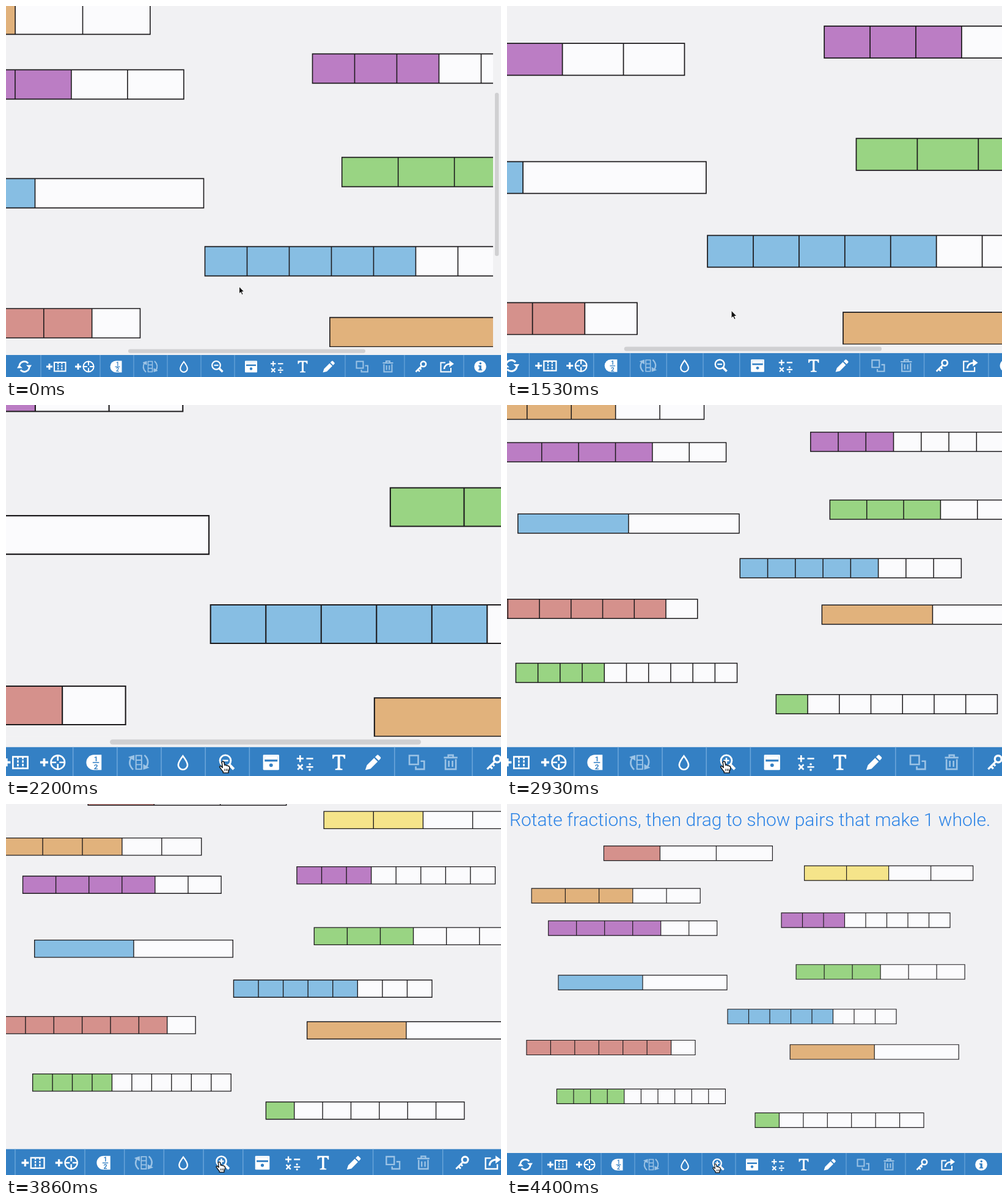
An HTML page for the animation above (6130 ms loop, 810x607 px).

```html
<!DOCTYPE html>
<html lang="en">
<head>
<meta charset="utf-8">
<title>Fraction bars</title>
<style>
html, body { margin: 0; width: 100%; height: 100%; overflow: hidden; background: #f1f1f3; }
svg { display: block; width: 100vw; height: 100vh; }
.title { font: 300 30px Roboto, sans-serif; fill: #2b83e6; }
.half { font: 700 9px Roboto, sans-serif; fill: #3480c4; text-anchor: middle; }
.line { fill: none; stroke: #fff; stroke-width: 2; }
.bold { stroke-width: 2.8; }
.dim { stroke: #9cc3e5; }
.solid { fill: #fff; }
.blue { fill: #3480c4; }
</style>
</head>
<body>
<svg viewBox="0 0 810 607" preserveAspectRatio="none">
  <rect width="810" height="607" fill="#f1f1f3"/>
  <g id="camera">
    <g id="board" stroke="#1c1a1c">
      <text class="title" x="4" y="36" stroke="none">Rotate fractions, then drag to show pairs that make 1 whole.</text>
    </g>
    <g id="scroll">
      <path d="M797 0H810V571H0V558H797Z" fill="#f1f1f3"/>
      <rect x="800" y="142" width="6.4" height="267" rx="3.2" fill="#d0d0d2"/>
      <rect x="200" y="561.4" width="388" height="6.4" rx="3.2" fill="#d0d0d2"/>
    </g>
    <rect y="571" width="810" height="36" fill="#3480c4"/>
    <path id="seps" stroke="#6ba5da" stroke-width="1.2"/>

    <g id="refresh">
      <path class="line bold" d="M22 588A8.2 8.2 0 0 1 36.2 584.6M38 592A8.2 8.2 0 0 1 23.8 595.4"/>
      <path class="solid" d="M33 587.6H42L38.5 593ZM27 592.4H18L21.500 587Z"/>
    </g>

    <g id="addBar">
      <path class="line bold" d="M66 590H76M71 585V595"/>
      <rect class="line" x="79" y="583" width="18.500" height="14.500"/>
      <path class="line" stroke-dasharray="3 1.400" d="M85.200 583V598M91.400 583V598"/>
    </g>

    <g id="addCircle">
      <path class="line bold" d="M113 590H123M118 585V595"/>
      <circle class="line" cx="135" cy="590" r="8.600"/>
      <path class="line" stroke-width="1.600" d="M135 582V588M135 592V598M127 590H133M137 590H143"/>
    </g>

    <g id="fraction">
      <path class="solid" d="M189.500 580.500V599.500H180A9.500 9.500 0 0 1 180 580.500Z"/>
      <path d="M178.500 590.200H186.500" stroke="#3480c4" stroke-width="1.200"/>
      <text class="half" x="182.500" y="588.600">1</text>
      <text class="half" x="182.500" y="598.300">2</text>
    </g>

    <g id="rotate">
      <path class="line dim" d="M229 599Q221.500 592 227 583.500M243 581Q250.500 588 245 596.500"/>
      <path class="dim" fill="#9cc3e5" d="M224 583.500L230 581.500V587ZM248 596.500L242 598.500V593Z"/>
      <path class="line dim" style="stroke-width:1.500" d="M232.500 581.500H239.500V598.500H232.500ZM232.500 587.200H239.500M232.500 592.800H239.500"/>
    </g>

    <path class="line" d="M291 582Q285.200 589.500 285.200 593.200A5.800 5.800 0 0 0 296.800 593.200Q296.800 589.500 291 582Z"/>

    <g id="lens">
      <circle class="line" cx="344" cy="587.800" r="6.800" style="stroke-width:2.200"/>
      <path class="line" style="stroke-width:3.400" d="M349 593L354.500 598.500"/>
      <path id="sign" class="line"/>
    </g>

    <g id="cover">
      <rect class="solid" x="391" y="580.500" width="20" height="19" rx="1"/>
      <path class="blue" d="M393 582.500H409V589H393Z"/>
      <circle class="blue" cx="401" cy="593.500" r="2.200"/>
      <path class="solid" d="M393 582.500H409V586.500H393Z"/>
    </g>

    <g id="math">
      <path class="line" d="M433 585.300H441.500M437.200 581V589.600M445 585.300H453.500M434.200 592.700L440.400 599M440.400 592.700L434.200 599M445 595.800H453.500"/>
      <circle class="solid" cx="449.200" cy="592.300" r="1.400"/>
      <circle class="solid" cx="449.200" cy="599.300" r="1.400"/>
    </g>

    <path class="solid" d="M477.500 580.500H493.500V585.500H492Q491.500 582.500 489 582.500H487V596.500Q487 598 490 598V599.500H481V598Q484 598 484 596.500V582.500H482Q479.500 582.500 479 585.500H477.500Z"/>
    <path class="solid" d="M518.500 599.500L520.500 593.500L529.500 584.500L534 589L525 598ZM530.700 583.300L533 581Q534 580 535 581L537.400 583.400Q538.400 584.400 537.400 585.400L535.200 587.700Z"/>

    <path class="line dim" d="M573.500 581.500H584.500V592.500H573.500ZM587.500 588.500H592V598.500H581.500V595"/>
    <path class="line dim" d="M616.500 584H633.500M622 583V581H628V583M618.500 586V598.500H631.500V586M622.700 588V595.500M627.300 588V595.500"/>

    <g id="key">
      <circle class="line" cx="683" cy="585.800" r="4.200" style="stroke-width:2.600"/>
      <path class="line" style="stroke-width:2.500" d="M680 589L670.500 598.500M674 595L677 598M677 592L679.500 594.500"/>
    </g>

    <g id="share">
      <path class="line" d="M719 583.500H711.500V598.500H728V592"/>
      <path class="line" style="stroke-width:2.600" d="M717 594Q717.500 586 727 585.500"/>
      <path class="solid" d="M725.500 580L733 585.500L725.500 591Z"/>
    </g>

    <g id="info">
      <circle class="solid" cx="776" cy="590" r="9.800"/>
      <circle class="blue" cx="776.300" cy="584.800" r="1.800"/>
      <path class="blue" d="M773 588H777.800V594.500H779.200V596.300H773V594.500H774.500V589.800H773Z"/>
    </g>

    <g id="cursor">
      <path id="arrow" d="M0 0V11.800L2.700 9.300L4.500 13.500L6.500 12.600L4.700 8.600H8.300Z" fill="#111" stroke="#fff" stroke-width=".9"/>
      <path id="hand" d="M-1.400 1.200Q-.2 -.6 1.200 1L2.200 5.200Q3.500 4 4.400 5.600Q5.700 4.700 6.400 6.200Q8 5.700 8.100 7.600V10.200L6.800 12.400V14.600H.2V13Q-1.500 11.600-3.200 8.600Q-5 6.800-3.600 6.200Q-2.400 6-.6 8Z" fill="#fff" stroke="#111" stroke-width="1.100" stroke-linejoin="round"/>
      <path id="fingers" d="M2.200 9.500V12.300M4.200 9.500V12.300M6 9.500V12.300" stroke="#111" stroke-width=".8"/>
    </g>
  </g>
</svg>
<script>
const LOOP = 6130, CLICK = 2795;
const $ = id => document.getElementById(id);
const color = {
  red: '#d5918c', yellow: '#f5e48a', orange: '#e1b27c',
  purple: '#bb7dc4', green: '#99d483', blue: '#87bee3'
};
// x, y, parts, shaded parts, colour
const bars = [
  [158.4, 68.6, 3, 1, 'red'], [486.6, 101.2, 4, 2, 'yellow'],
  [40.2, 138.2, 5, 3, 'orange'], [67.7, 191.2, 6, 4, 'purple'],
  [449, 178.2, 8, 3, 'purple'], [473.1, 262.8, 6, 3, 'green'],
  [84, 280.2, 2, 1, 'blue'], [361, 335.8, 8, 5, 'blue'],
  [32, 386.5, 7, 6, 'red'], [463.2, 393.8, 2, 1, 'orange'],
  [81.4, 466.4, 10, 4, 'green'], [406, 505.4, 7, 1, 'green']
];
const WIDTH = 276, HEIGHT = 24;

function add(name, attrs) {
  const el = document.createElementNS('http://www.w3.org/2000/svg', name);
  for (const key in attrs) el.setAttribute(key, attrs[key]);
  $('board').append(el);
}

for (const [x, y, parts, shaded, hue] of bars) {
  const step = WIDTH / parts;
  const box = { x, y, height: HEIGHT };
  add('rect', { ...box, width: WIDTH, fill: '#fbfbfd', stroke: 'none' });
  add('rect', { ...box, width: step * shaded, fill: color[hue], stroke: 'none' });
  let d = `M${x} ${y}h${WIDTH}v${HEIGHT}h${-WIDTH}z`;
  for (let i = 1; i < parts; i++) d += `M${x + step * i} ${y}v${HEIGHT}`;
  add('path', { d, fill: 'none' });
}
$('seps').setAttribute('d', [57, 154, 209, 264, 319, 374, 555, 652, 749]
  .map(x => `M${x} 571v36`).join(''));

const unit = (t, start, length) => Math.min(1, Math.max(0, (t - start) / length));
const ease = u => u ** 1.78 / (u ** 1.78 + (1 - u) ** 1.78);
const show = (id, on) => $(id).setAttribute('visibility', on ? 'visible' : 'hidden');

function draw(time) {
  const t = Math.floor((time + 6.7) * 0.015) / 0.015;
  const zoom = 1 + 0.312 * (ease(unit(t, 1166, 1000)) - ease(unit(t, 3403, 1000)));
  $('camera').setAttribute('transform', `translate(296 607) scale(${zoom}) translate(-296 -607)`);

  const near = time < CLICK;
  $('board').setAttribute('transform', near ? 'translate(-396.5 -278) scale(2)' : '');
  $('board').setAttribute('stroke-width', near ? 0.8 : 1.15);
  show('scroll', near);
  $('sign').setAttribute('d', near ? 'M340.5 587.8H347.5' : 'M340.5 587.8H347.5M344 584.3V591.3');

  const move = ease(unit(t, 1200, 670));
  const x = 381.5 - 40.5 * move, y = 459 + 129.5 * move ** 1.42;
  $('cursor').setAttribute('transform', `translate(${x} ${y})`);
  const over = y > 571;
  show('arrow', !over);
  show('hand', over);
  show('fingers', over);
}

const begin = performance.now();
function tick() {
  draw((performance.now() - begin) % LOOP);
  requestAnimationFrame(tick);
}
tick();
</script>
</body>
</html>
```
